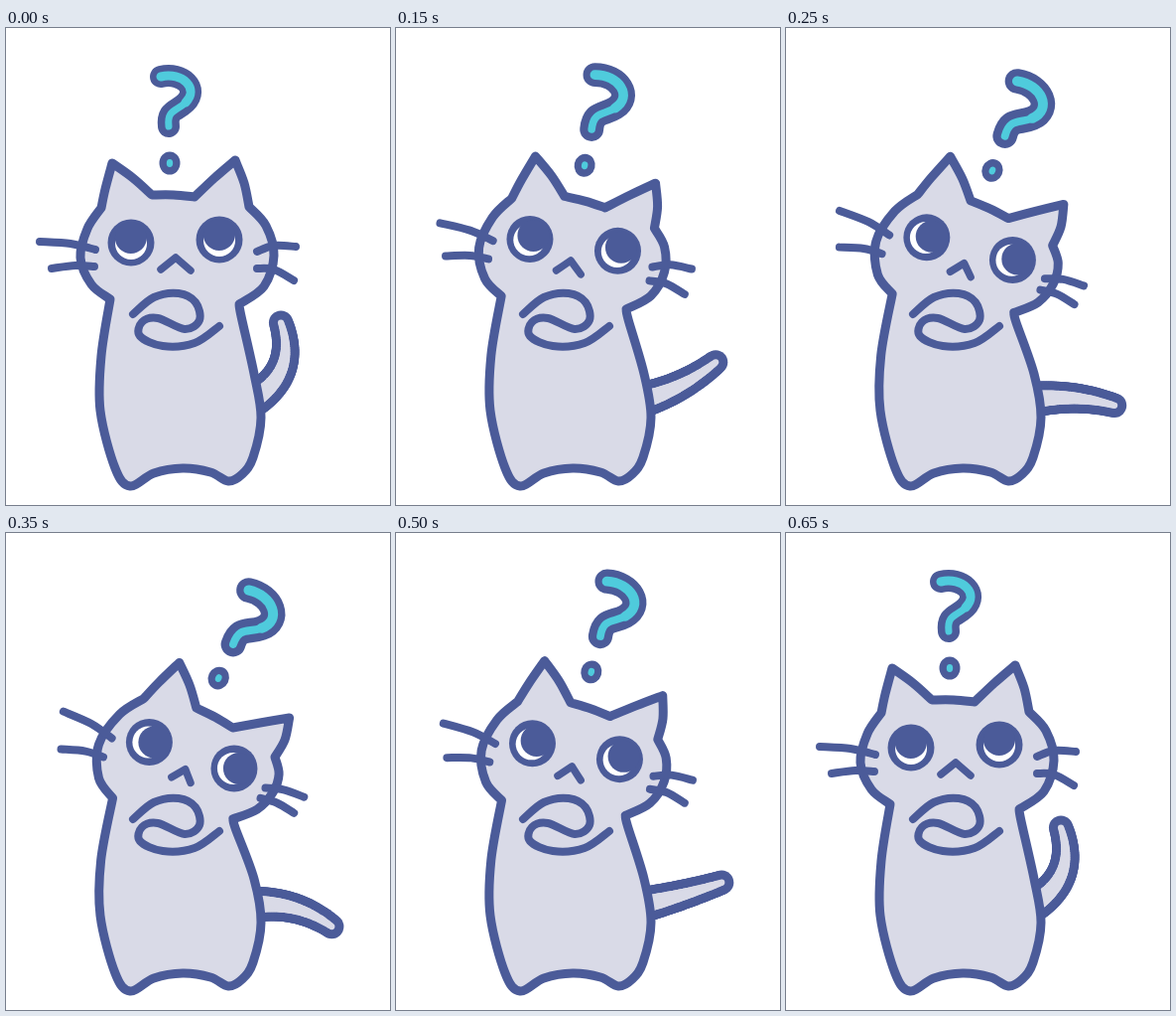
An HTML page with a canvas for the animation above (700 ms loop, 387 by 480 pixels).

```html
<!DOCTYPE html>
<html lang="en">
<head>
<meta charset="utf-8">
<title>Curious cat</title>
<style>
  html, body { margin: 0; width: 100%; height: 100%; overflow: hidden; background: #fff; }
  canvas { display: block; width: 387px; height: 480px; }
</style>
</head>
<body>
<canvas id="stage"></canvas>
<script>
const INK = '#4b5b99', FUR = '#d9dae7', CYAN = '#4fcbdc';
const SLOT = 50, SLOTS = 14;
const rad = deg => deg * Math.PI / 180;

// The upright cat; a slash marks a corner between two smooth runs.
const outline = parse('105,273 86,258 75,231 82,202 96,181/100,162 107,136/128,151 147,168/' +
  '169,168 190,170/210,151 231,133/240,156 245,180/262,199 270,229 260,260 235,278/' +
  '237,290 250,348 257,392 249,432 238,449 224,456 206,447 178,443 149,448 ' +
  '125,461 110,443 95,385 96,330 105,273');
const arm = parse('128,288 149,271 174,267 191,276 195,294 180,303 153,292 137,296 135,310 158,320 190,317 215,300');
const whiskers = parse('34,215 65,217 90,223/46,242 70,239 89,240/' +
  '253,225 270,219 292,220/253,242 270,243 290,254');
const eyes = [[126, 216], [215, 213]];
const hook = 'M156 49C178 44 195 61 181 75';
const markTop = new Path2D(hook);
const mark = new Path2D(hook + 'C172 84 162 82 164 99');

const canvas = document.getElementById('stage');
const ctx = canvas.getContext('2d');
const scale = window.devicePixelRatio || 1;
canvas.width = 387 * scale;
canvas.height = 480 * scale;
ctx.scale(scale, scale);
ctx.lineCap = ctx.lineJoin = 'round';

function parse(text) {
  return text.split('/').map(run => run.split(' ').map(p => p.split(',').map(Number)));
}

// Both end poses last two slots; the lean eases in and falls back almost evenly.
function leanAt(slot) {
  const step = slot - (slot >= 1) - (slot >= 8);
  return step <= 6 ? Math.sin(Math.PI * step / 12) : 1 - ((step - 6) / 5) ** 1.1;
}

// Turns a point about the neck: fully at the ears, not at all at the belly.
function bend([x, y], lean, squash = 0) {
  const k = Math.min(1, Math.max(0, (350 - y) / 218));
  const w = k * k * (3 - 2 * k);
  const a = rad(28) * lean * w;
  const dx = (x - 152) * (1 - squash * lean * 4 * w * (1 - w)), dy = y - 269;
  return [152 + dx * Math.cos(a) - dy * Math.sin(a), 269 + dx * Math.sin(a) + dy * Math.cos(a)];
}

// Catmull-Rom curve from the first point, which is already on the path.
function curve(pts) {
  for (let i = 0; i < pts.length - 1; i++) {
    const p = pts[i], q = pts[i + 1];
    const before = pts[i - 1] || p, after = pts[i + 2] || q;
    ctx.bezierCurveTo(
      p[0] + (q[0] - before[0]) / 6, p[1] + (q[1] - before[1]) / 6,
      q[0] - (after[0] - p[0]) / 6, q[1] - (after[1] - p[1]) / 6,
      q[0], q[1]);
  }
}

function line(runs, width, fill) {
  let last = runs[0][0];
  ctx.beginPath();
  ctx.moveTo(...last);
  runs.forEach((run, i) => {
    curve(i ? [last, ...run] : run);
    last = run[run.length - 1];
  });
  if (fill) {
    ctx.fillStyle = fill;
    ctx.fill();
  }
  ctx.lineWidth = width;
  ctx.strokeStyle = INK;
  ctx.stroke();
}

function stroke(path, width, color) {
  ctx.lineWidth = width;
  ctx.strokeStyle = color;
  ctx.stroke(path);
}

function oval(x, y, rx, ry, color) {
  ctx.beginPath();
  ctx.ellipse(x, y, rx, ry, 0, 0, Math.PI * 2);
  ctx.fillStyle = color;
  ctx.fill();
}

// The tail swings down with the lean while its curl turns over.
function drawTail(lean) {
  const a = rad(-71 + 87 * lean), curl = 34 - 50 * lean;
  const c = Math.cos(a), s = Math.sin(a);
  for (const [inset, color] of [[0, INK], [9, FUR]]) {
    for (let u = 0; u <= 1; u += 0.02) {
      const along = 84 * u, side = 2 * u * (1 - u) * curl, r = 18 - 6 * u - inset;
      oval(249 + along * c - side * s, 374 + along * s + side * c, r, r, color);
    }
  }
}

function drawEye(center, lean) {
  const [x, y] = bend(center, lean);
  const gaze = rad(88 + 92 * lean), dx = Math.cos(gaze), dy = Math.sin(gaze);
  oval(x, y, 23.5, 23.5, INK);
  oval(x + dx, y + dy, 16, 16, '#fff');
  oval(x - dx * 5, y - dy * 5, 16, 16, INK);
}

function drawMark(lean) {
  const grow = 1 + 0.12 * Math.sin(lean * Math.PI / 2);
  ctx.save();
  ctx.translate(167, 252);
  ctx.rotate(rad(25) * lean);
  ctx.translate(-167, -252);
  oval(165, 136, 10.5, 11.5, INK);
  oval(165, 136, 3.2, 4, CYAN);
  ctx.translate(164, 99);
  ctx.scale(grow, grow);
  ctx.translate(-164, -99);
  stroke(mark, 22, INK);
  stroke(mark, 7, CYAN);
  stroke(markTop, 9, CYAN);
  ctx.restore();
}

function draw(lean) {
  const bent = (runs, squash) => runs.map(run => run.map(p => bend(p, lean, squash)));
  const half = 15 - 5 * lean;

  ctx.fillStyle = '#fff';
  ctx.fillRect(0, 0, 387, 480);
  drawTail(lean);
  line(bent(outline, 0.07), 9, FUR);
  eyes.forEach(eye => drawEye(eye, lean));
  line(bent([[[171 - half, 243]], [[171, 231]], [[171 + half, 244]]]), 7.5);
  line(arm, 8);
  bent(whiskers).forEach(w => line([w], 8));
  drawMark(lean);
}

let shown = -1;
function tick() {
  const slot = Math.floor(performance.now() / SLOT) % SLOTS;
  if (slot !== shown) draw(leanAt(shown = slot));
  requestAnimationFrame(tick);
}
tick();
</script>
</body>
</html>
```
